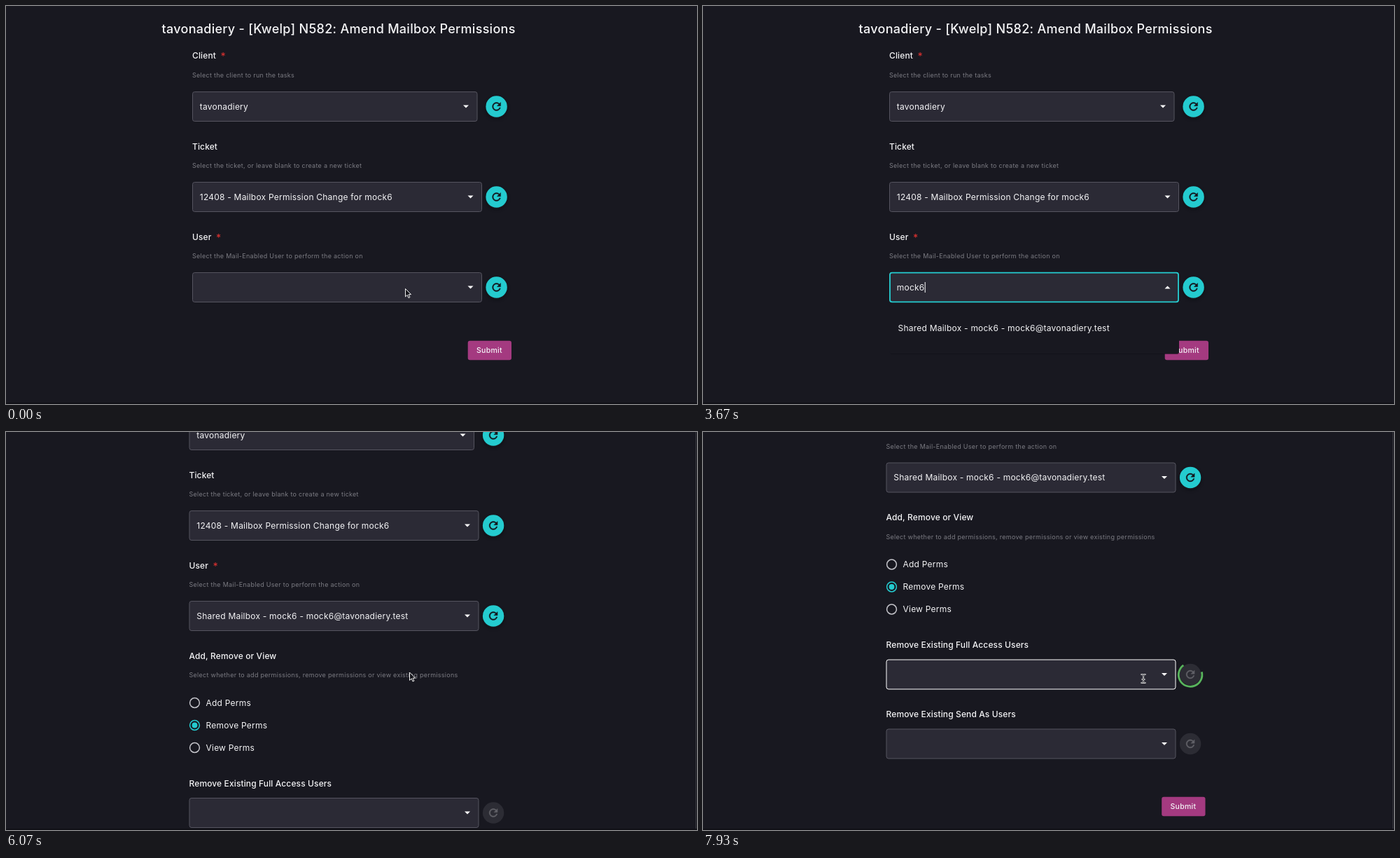
An HTML page for the animation above (8000 ms loop, 987 by 568 pixels).

```html
<!DOCTYPE html>
<html lang="en">
<head>
<meta charset="utf-8">
<title>Mailbox permissions form</title>
<style>
  html, body { margin: 0; width: 100%; height: 100%; overflow: hidden; background: #181820; }
  svg { display: block; width: 100%; height: 100%; }
  text { font: 400 12px Inter, "Noto Sans", sans-serif; letter-spacing: .22px; fill: #f4f4f6; white-space: pre; }
  .title { font-size: 18px; font-weight: 500; letter-spacing: .28px; }
  .label { font-weight: 500; letter-spacing: .12px; }
  .hint { font-size: 9px; letter-spacing: .28px; fill: #7b7b82; }
  .button { font-size: 10.5px; font-weight: 500; letter-spacing: .3px; }
  .star { font-size: 14px; fill: #d3302f; }
  .box { fill: #2b2a35; stroke: #55545f; }
  .ring { fill: none; stroke: #c3c3c9; stroke-width: 1.5; }
  .ring.on { stroke: #24cbcf; }
</style>
</head>
<body>
<svg viewBox="0 0 987 568" preserveAspectRatio="none">
  <defs>
    <filter id="soft" x="-50%" y="-50%" width="200%" height="200%"><feGaussianBlur stdDeviation="2.5"/></filter>
    <path id="refresh" transform="scale(.75) translate(-12 -12)" stroke-width=".5" d="M17.65 6.35C16.2 4.9 14.21 4 12 4c-4.42 0-7.99 3.58-7.99 8s3.57 8 7.99 8c3.73 0 6.84-2.55 7.73-6h-2.08c-.82 2.33-3.04 4-5.65 4-3.31 0-6-2.69-6-6s2.69-6 6-6c1.66 0 3.14.69 4.22 1.78L13 11h7V4z"/>
  </defs>
  <rect width="987" height="568" fill="#181820"/>
  <g id="page"></g>
  <rect id="bar" x="985" width="1" height="568" fill="#38383e"/>
  <rect y="566" width="987" height="2" fill="#111117"/>
  <path id="arrow" d="M0 0V11.4L2.7 8.9 4.5 13 6.4 12.2 4.6 8.2H8.1Z" fill="#15151b" stroke="#f2f2f2" stroke-linejoin="round"/>
  <g id="beam" fill="none" stroke-linecap="round">
    <path d="M-2.6-6Q0-6 0-4V4Q0 6-2.6 6M2.6-6Q0-6 0-4M2.6 6Q0 6 0 4M-1.5 1H1.5" stroke="#f2f2f2" stroke-width="2.2"/>
    <path d="M-2.4-6Q0-6 0-4V4Q0 6-2.4 6M2.4-6Q0-6 0-4M2.4 6Q0 6 0 4M-1.2 1H1.2" stroke="#222229" stroke-width=".8"/>
  </g>
</svg>
<script>
const LOOP = 8000, TYPE = 2800, KEY_GAP = 160, OPEN = 2400, PICK = 4530, REMOVE = 5760, HOVER = 6550, SPIN = 7020;
const CLIENT = 'tavonadiery', NAME = 'mock6';
const USER = `Shared Mailbox - ${NAME} - ${NAME}@${CLIENT}.test`;
const $ = id => document.getElementById(id);

const text = (x, y, s, cls = '', size = 12, id = '') =>
  `<text id="${id}" class="${cls}" x="${x}" y="${y + size * .36}">${s}</text>`;
const label = (y, s, required) =>
  text(266, y, s + (required ? '<tspan class="star" dx="6.5" dy="2">*</tspan>' : ''), 'label');
const hint = (y, s) => text(266, y, s, 'hint', 9);

function refresh(y, active) {
  const shadow = active ? `<circle cx="700.6" cy="${y + 2.5}" r="15" fill="#0b0b10" opacity=".5" filter="url(#soft)"/>` : '';
  const ink = active ? '#15151c' : '#606067';
  return `${shadow}<circle cx="700.6" cy="${y}" r="15.2" fill="${active ? '#24cbcf' : '#2c2c34'}"/>
    <use href="#refresh" transform="translate(700.6 ${y})" fill="${ink}" stroke="${ink}"/>`;
}

function select(y, value, { right = 679.5, id = '', active = true } = {}) {
  return `<rect class="box" id="${id}Box" x="266.5" y="${y - 21}" width="${right - 266.5}" height="42" rx="3"/>
    ${text(276.8, y, value, '', 12, id + 'Text')}
    <path id="${id}Tip" transform="translate(${right - 16} ${y})" d="M-4-1.9H4L0 2.1Z" fill="#fff"/>
    ${refresh(y, active)}`;
}

const radio = (y, s, id = '') => `<circle class="ring" id="${id}" cx="274" cy="${y}" r="6.9"/>${text(290, y, s)}`;

$('page').innerHTML = `
  ${text(222.5, 33, `${CLIENT} - [Kwelp] N582: Amend Mailbox Permissions`, 'title', 18)}
  ${label(71, 'Client', true)}
  ${hint(99, 'Select the client to run the tasks')}
  ${select(143.5, CLIENT, { right: 673, id: 'client' })}
  ${label(200.5, 'Ticket')}
  ${hint(228, 'Select the ticket, or leave blank to create a new ticket')}
  ${select(272.5, `12408 - Mailbox Permission Change for ${NAME}`, { id: 'ticket' })}
  ${label(329.5, 'User', true)}
  ${hint(357, 'Select the Mail-Enabled User to perform the action on')}
  ${select(401.5, '', { id: 'user' })}
  <rect id="focus" x="267" y="380.7" width="412" height="41.6" rx="3" fill="none" stroke="#24cbcf" stroke-width="1.8"/>
  <rect id="caret" y="394" width="1" height="15" fill="#fff"/>
  <g id="action">
    ${label(458.5, 'Add, Remove or View')}
    ${hint(486, 'Select whether to add permissions, remove permissions or view existing permissions')}
    ${radio(525.5, 'Add Perms')}
    ${radio(557.5, 'Remove Perms', 'removeRing')}
    <circle id="dot" cx="274" cy="557.5" r="3.9" fill="#24cbcf"/>
    ${radio(589.5, 'View Perms')}
  </g>
  <g id="lists">
    ${label(640.5, 'Remove Existing Full Access Users')}
    ${select(682.5, '', { id: 'full', active: false })}
    <path id="spinner" fill="none" stroke="#58b45c" stroke-width="2.8"/>
    ${label(739.5, 'Remove Existing Send As Users')}
    ${select(781.5, '', { id: 'send', active: false })}
  </g>
  <g id="submit">
    <rect x="659.7" y="-.3" width="62.3" height="27.5" rx="3" fill="#a43a80"/>
    ${text(672, 13.5, 'Submit', 'button', 10.5)}
  </g>
  <g id="menu">
    <rect x="267" y="430" width="413" height="67" rx="3" fill="#101016" opacity=".6"/>
    <rect x="266" y="426" width="414" height="70" rx="3" fill="#181820"/>
    ${text(278.6, 459.5, USER)}
  </g>`;

const ease = (t, a, b) => {
  const k = Math.min(1, Math.max(0, (t - a) / (b - a)));
  return k * k * (3 - 2 * k);
};
const show = (id, on) => $(id).style.display = on ? '' : 'none';
const move = (id, x, y) => $(id).setAttribute('transform', `translate(${x} ${y})`);

// pointer stops: time, x, y
const stops = [
  [0, 570.5, 403.5], [900, 570.5, 403.5], [1400, 571.5, 401], [3700, 571.5, 401],
  [4200, 560, 454], [4560, 560, 454], [4900, 623, 338.5], [5300, 623, 338.5],
  [5650, 270, 415], [5810, 270, 415], [6065, 576.5, 343], [6300, 576.5, 343],
  [6640, 588, 339], [7100, 588, 339], [7800, 629, 352], [LOOP, 629, 352]
];

function pointer(t) {
  const i = stops.findIndex(s => s[0] > t);
  const [a, x, y] = stops[i - 1], [b, u, v] = stops[i];
  const k = ease(t, a, b);
  return [x + (u - x) * k, y + (v - y) * k];
}

function spinnerPath(t) {
  const u = (t - SPIN) / 1400 % 1;
  const start = u < .5 ? 15 * ease(u, 0, .5) : 15 + 110 * ease(u, .5, 1);
  const length = Math.min(126 - start, u < .5 ? 1 + 99 * ease(u, 0, .5) : 100);
  const turn = 2 * Math.PI, a = turn * (start / 126 + u), sweep = turn * length / 126;
  const at = q => `${700.6 + 16.8 * Math.cos(q)} ${683 + 16.8 * Math.sin(q)}`;
  return `M${at(a)}A16.8 16.8 0 ${sweep > Math.PI ? 1 : 0} 1 ${at(a + sweep)}`;
}

function draw(t) {
  const picked = t >= PICK, open = t >= OPEN && !picked, removing = t >= REMOVE, hover = t >= HOVER;
  const scroll = 139 * ease(t, 4810, 5310) + 197.5 * ease(t, 6250, 6600);
  move('page', picked ? -4.5 : 0, -scroll);
  show('bar', picked);
  show('action', picked);
  show('lists', removing);
  show('dot', removing);
  $('removeRing').classList.toggle('on', removing);
  move('submit', 0, removing ? 857.5 : picked ? 660 : 478);

  const typed = Math.max(0, Math.min(NAME.length, Math.floor((t - TYPE) / KEY_GAP) + 1));
  $('userText').textContent = picked ? USER : NAME.slice(0, typed);
  $('userTip').setAttribute('transform', `translate(663.5 401.5) scale(1 ${open ? -1 : 1})`);
  show('focus', open);
  show('menu', open && typed > 0);
  const lastKey = typed ? TYPE + (typed - 1) * KEY_GAP : OPEN;
  show('caret', open && (t - lastKey) % 1060 < 530);
  $('caret').setAttribute('x', 277 + (typed ? $('userText').getComputedTextLength() : 0));

  $('fullBox').style.stroke = hover ? '#fff' : '';
  show('spinner', t >= SPIN);
  if (t >= SPIN) $('spinner').setAttribute('d', spinnerPath(t));

  const [x, y] = pointer(t);
  show('arrow', !hover && (t < TYPE || t > 3700));
  show('beam', hover);
  move('arrow', x, y);
  move('beam', x, y);
}

function tick() {
  draw(performance.now() % LOOP);
  requestAnimationFrame(tick);
}
tick();
</script>
</body>
</html>
```
